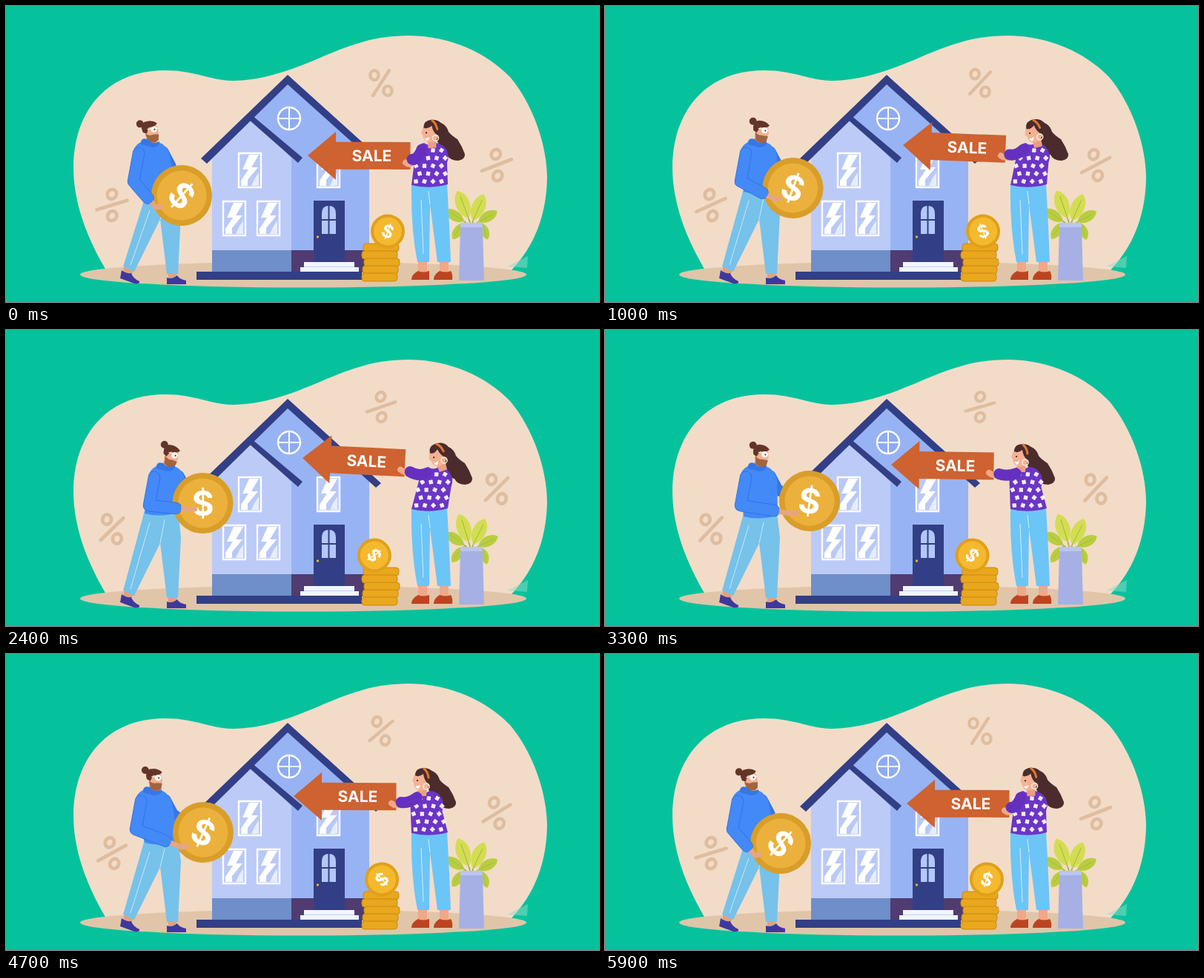
An HTML page for the animation above (6000 ms loop, 800 px wide and 400 px high).

```html
<!DOCTYPE html>
<html lang="en">
<head>
<meta charset="utf-8">
<title>House for sale</title>
<style>
  html, body { margin: 0; width: 100%; height: 100%; overflow: hidden; background: #05c29d; }
  svg { display: block; width: 100vw; height: 100vh; }
  text { font-family: Inter, "Open Sans", sans-serif; font-weight: 700; fill: #fff; text-anchor: middle; }
  .round { fill: none; stroke-linecap: round; stroke-linejoin: round; }
</style>
</head>
<body>
<svg viewBox="0 0 800 400" xmlns="http://www.w3.org/2000/svg">
  <defs>
    <g id="percent" class="round" stroke="#dfbd9f" stroke-width="4.4">
      <path d="M-11 17L11 -17"/>
      <ellipse cx="-9" cy="-10.500" rx="5.600" ry="6.400"/>
      <ellipse cx="9" cy="10.500" rx="5.600" ry="6.400"/>
    </g>
    <g id="window">
      <path d="M0 0H32V48H0z" fill="#b9c9f7"/>
      <path d="M15 3H28L18 20H27L13 37V45H4V38L14 23H6z" fill="#fff"/>
      <path d="M28 27V45H18L22 36z" fill="#e6edfd"/>
      <path d="M1 1H31V47H1z" fill="none" stroke="#fff" stroke-width="2.4"/>
    </g>
    <path id="flower" d="M-1.800 0H1.800M0 -1.800V1.800" class="round" stroke="#f6effd" stroke-width="3.2"/>
    <path id="leaf" d="M0 0C-17 -13 -15 -38 -2 -48C13 -40 15 -14 0 0z"/>
  </defs>

  <path fill="#f2dcc8" d="M135 357C112 318 91 270 91 218C91 172 108 132 140 109C166 90 198 85 230 87.500C262 91 280 101 306 101C376 100 430 62 480 49C500 43 520 40 545 40C600 41 648 63 680 96C712 134 730 190 730 232C729 285 712 325 682 357z"/>
  <use href="#percent" id="pTop"/>
  <use href="#percent" id="pLeft"/>
  <use href="#percent" id="pRight"/>
  <ellipse cx="401" cy="363" rx="301" ry="17.500" fill="#e0c5a9"/>
  <path d="M676 352L704 338L703 354z" fill="#8fdcc6" opacity=".5"/>

  <g id="house">
    <path d="M380 98L490 203V331H385V206L331 152z" fill="#98b3f4"/>
    <path d="M331 152L385 206V331H278V205z" fill="#bccaf8"/>
    <path d="M278 330H385V360H278z" fill="#6e8fc9"/>
    <path d="M385 330H490V360H385z" fill="#503c70"/>
    <path d="M380 93L506 207L499 213L380 106L271 213L263 206z" fill="#323f86"/>
    <path d="M331 147L400 205L394 212L327 153z" fill="#323f86"/>
    <circle cx="382" cy="152" r="15" fill="#8eabef" stroke="#fff" stroke-width="2.4"/>
    <path d="M382 137V167M367 152H397" stroke="#fff" stroke-width="2"/>
    <use href="#window" x="313" y="198"/>
    <use href="#window" x="292" y="263"/>
    <use href="#window" x="338" y="263"/>
    <use href="#window" x="419" y="198"/>
    <path d="M415 263H457V347H415z" fill="#323f86"/>
    <path d="M426 308V281Q426 270 435.5 270T445 281V308z" fill="#b3c8f9"/>
    <path d="M435.5 270V308M426 289H445" stroke="#323f86" stroke-width="2"/>
    <circle cx="420.500" cy="312" r="1.7" fill="#efb62e"/>
    <path d="M257 359H480V370H257z" fill="#323f86"/>
    <path d="M402 346H470V353H402zM397 353H476V359H397z" fill="#f1f5fd"/>
    <path d="M402 352.500H470" stroke="#c4d3f0"/>
  </g>

  <g id="stack" fill="#e9a71d" stroke="#c98a12" stroke-width="1"></g>
  <g id="smallCoin">
    <circle r="23" fill="#e0a01a"/><circle r="19" fill="#f4b92e"/>
    <text y="8.700" font-size="24">$</text>
  </g>

  <g id="leaves"></g>
  <path d="M613 299H643L645 371H611z" fill="#a6b0e5"/>
  <path d="M613 293H643V299H613z" fill="#bcc4f0"/>

  <g id="arrow">
    <path d="M0 0L38 -32.500V-18.500H138.500V18.500H38V32.500z" fill="#ce6230"/>
    <text x="86.500" y="7.500" font-size="21">SALE</text>
  </g>

  <g id="woman">
    <path d="M556 340H568V361H556zM585 340H597V361H585z" fill="#f0a888"/>
    <path d="M547 370Q547 363 556 358Q562 361 571 358V370zM577 370Q577 363 585 358Q593 361 600 358Q603 363 602 370z" fill="#bd4420"/>
    <path d="M547 241H595Q598 290 600 346H582L572 268L571 346H555Q546 300 547 241z" fill="#6cc5f7"/>
    <path d="M572 268L570 250M560 262L563 335" stroke="#d2effd" fill="none"/>
    <path id="tail" fill="#4c2b2c" d="M5 -31Q22 -31 26 -17Q30 -12 38 -7Q44 2 48 13Q49 20 39 22Q28 22 24 14Q16 12 14 3L7 -14z"/>
    <path id="blouse" fill="#6b35c6"/>
    <g id="flowers"></g>
    <g id="wFace"><g transform="translate(0 16)">
      <path d="M-3 -8H9L8 5H-3z" fill="#eb9f80"/>
      <path d="M-8 -24Q3 -32 11 -21L11 -8Q5 -1 -3 -3Q-9 -6 -9 -13L-11 -15z" fill="#f4b294"/>
      <path d="M-7 -23Q-7 -33 5 -33Q21 -32 20 -14Q15 -6 11 -11Q5 -16 4 -25Q-2 -20 -7 -23z" fill="#4c2b2c"/>
      <path d="M5 -32Q10 -28 11 -20" class="round" stroke="#dc7a2e" stroke-width="3"/>
      <path d="M-7 -9Q-3 -8 0 -10Q-1 -5 -4 -5z" fill="#fff"/>
      <circle cx="-4" cy="-16" r="1.100" fill="#392020"/>
      <circle cx="8" cy="-8" r="4" fill="none" stroke="#f8edda" stroke-width="1.600"/>
    </g></g>
    <path id="wArm" class="round" stroke="#f0a888" stroke-width="8"/>
    <path id="wSleeve" class="round" stroke="#6530bf" stroke-width="15"/>
  </g>

  <g id="man">
    <path d="M160 348L173 352L170 362L158 361zM219 355H230V368H219z" fill="#e2a17f"/>
    <path d="M156 357Q162 362 169 361Q171 368 180 372Q181 376 173 375L154 368zM217 367Q224 370 231 364Q233 369 243 371V376H217z" fill="#3d399c"/>
    <path id="pants" fill="#76c2eb"/>
    <path id="seam" stroke="#c8e9f9" fill="none"/>
    <path id="backArm" class="round" stroke="#3577e4" stroke-width="15"/>
    <path id="hoodie" fill="#4389f7"/>
    <g id="coin">
      <circle r="41" fill="#d99e29"/><circle r="33.500" fill="#ebb13c"/>
      <text y="16.500" font-size="46">$</text>
    </g>
    <path id="armEdge" class="round" stroke="#2d6cdd" stroke-width="16.500"/>
    <path id="hand" class="round" stroke="#e6a583" stroke-width="7"/>
    <path id="arm" class="round" stroke="#4389f7" stroke-width="15"/>
    <g id="mHead">
      <path d="M-7 -11H6L7 2Q0 5 -7 1z" fill="#d9936f"/>
      <path d="M-9 -24L7 -25L10 -14L8 -3Q-2 0 -8 -8z" fill="#f0b191"/>
      <path d="M-8 -12Q-2 -8 2 -10H10L9 -2Q2 3 -5 -2z" fill="#a2633f"/>
      <path d="M-11 -14Q-15 -24 -8 -28Q2 -31 9 -25Q6 -20 -3 -20L-6 -12z" fill="#633528"/>
      <circle cx="-14" cy="-26" r="5" fill="#633528"/>
      <path d="M-5 -18H9" stroke="#fff" stroke-width="1"/>
      <circle cx="4" cy="-17" r="3.600" fill="#fdf4ea" stroke="#fff"/>
      <circle cx="5" cy="-17" r="1" fill="#392020"/>
    </g>
    <path id="hood" fill="#3577e4"/>
  </g>
</svg>
<script>
const LOOP = 6000, STEP = 100, CYCLE = 5900;
const times = [0, 1000, 1800, 2400, 3300, 4700];
const tracks = {
  coinX:   [237, 253.5, 263.5, 265.5, 276, 266],
  coinY:   [256, 246, 234, 234, 231, 241],
  coinRot: [42, 20, 3, 0, 8, 24],
  handX:   [-35, -25, -17, -17, -24, -29],
  handY:   [16, 15, 8, 9, 17, 20],
  neckX:   [197, 208, 218, 218, 208, 200],
  nod:     [-5, 12, 20, 20, 12, 4],
  waistY:  [264, 251, 248, 248, 252, 255],
  arrowX:  [407, 402, 402, 400, 386, 388],
  arrowY:  [202, 188, 174, 173, 182, 192],
  arrowRot:[0.2, 2.2, 2.7, 2.8, 0.8, 0.3],
  wNeckX:  [571, 577, 582, 581, 559, 559],
  wNod:    [-4, -14, -22, -18, 0, 0]
};

const $ = id => document.getElementById(id);
const path = (id, d) => $(id).setAttribute("d", d);
const place = (id, x, y, r = 0, s = 1) =>
  $(id).setAttribute("transform", `translate(${x} ${y}) rotate(${r}) scale(${s})`);
const mix = (a, b, k) => a + (b - a) * k;

// Cyclic cubic through the keys, flat at turning points
function sample(v, t) {
  const n = v.length;
  const at = i => times[(i + n) % n] + Math.floor(i / n) * CYCLE;
  const val = i => v[(i + n) % n];
  const slope = i => (val(i + 1) - val(i)) / (at(i + 1) - at(i));
  const tangent = i => {
    const a = slope(i - 1), b = slope(i);
    return a * b <= 0 ? 0 : 2 * a * b / (a + b);
  };
  let i = n - 1;
  while (t < times[i]) i--;
  const h = at(i + 1) - at(i), u = (t - at(i)) / h, w = 1 - u;
  return val(i) * w * w * (1 + 2 * u) + val(i + 1) * u * u * (3 - 2 * u)
    + h * u * w * (tangent(i) * w - tangent(i + 1) * u);
}

$("stack").innerHTML = [[482, 321], [480, 331], [483, 341], [481, 351], [480, 361]]
  .map(([x, y]) => `<rect x="${x}" y="${y}" width="48" height="11" rx="4"/>`).join("");

// Each leaf: base, angle, size
$("leaves").innerHTML = [
  [-10, -4, -57, .62], [9, -3, 62, .62], [-11, -2, -145, .55],
  [15, -1, 165, .47], [-4, -8, -20, .84], [2, -5, 24, .8]
].map(([x, y, r, s], i) => `<path d="M0 4L${x} ${y}" stroke="#92ae31" stroke-width="1.5"/>`
  + `<g transform="translate(${x} ${y}) rotate(${r}) scale(${s})">`
  + `<use href="#leaf" fill="${i < 4 ? "#b9cd40" : "#d3dd52"}"/><path d="M0 0V-38" stroke="#9db437"/></g>`).join("");

const flowers = [];
for (let row = 0; row < 5; row++)
  for (let col = 0; col < 4; col++)
    flowers.push([553 + col * 11.5 + (row % 2) * 5, 195 + row * 10.5]);
$("flowers").innerHTML = flowers.map(() => '<use href="#flower"/>').join("");
const flowerNodes = [...$("flowers").children];

function drawMan(p) {
  const { neckX: n, waistY: w, coinX: cx, coinY: cy } = p;
  const hx = cx + p.handX, hy = cy + p.handY;
  path("pants", `M187 ${w - 4}L158 352L173 359L208 288L217 362H232L236 280L232 ${w - 4}z`);
  path("seam", `M194 ${w + 12}L168 350M214 ${w + 8}L208 288`);
  path("backArm", `M${n + 15} 197L${n + 25} 216L${cx - 8} ${cy}`);
  path("hoodie", `M${n - 10} 182Q${n - 27} 187 ${n - 26} 204L187 ${w}Q210 ${w + 6} 233 ${w - 2}L${n + 24} 202Q${n + 20} 188 ${n + 9} 184z`);
  path("hood", `M${n - 15} 187Q${n - 16} 177 ${n - 6} 180Q${n} 188 ${n + 10} 183Q${n + 11} 190 ${n} 191z`);
  const ex = n - 25, limb = `M${n - 18} 199L${ex} 237L${mix(ex, hx, .65)} ${mix(237, hy, .65)}`;
  path("arm", limb);
  path("armEdge", limb);
  path("hand", `M${mix(ex, hx, .6)} ${mix(237, hy, .6)}L${hx} ${hy}l6 -1`);
  place("coin", cx, cy, p.coinRot);
  place("mHead", n, 184, p.nod);
}

function drawWoman(p) {
  const n = p.wNeckX, c = mix(571, n, .55), a = p.arrowRot * Math.PI / 180;
  const hx = p.arrowX + 135, hy = p.arrowY + 135 * Math.sin(a) + 11;
  const sx = c - 10, mx = (sx + hx) / 2, my = Math.max(198, hy) + 2;
  place("tail", n, 187);
  place("wFace", n, 171, p.wNod);
  path("blouse", `M${c - 7} 185Q${c - 20} 188 ${c - 19} 202L547 242Q571 248 596 241L${c + 24} 212Q${c + 29} 200 ${c + 20} 190Q${c + 14} 185 ${c + 7} 185Q${c} 190 ${c - 7} 185z`);
  flowerNodes.forEach((f, i) => {
    const [x, y] = flowers[i];
    f.setAttribute("transform", `translate(${x + (c - 571) * (243 - y) / 56} ${y}) rotate(${i * 25})`);
  });
  path("wArm", `M${sx} 196Q${mx} ${my} ${hx} ${hy}l-3 -2`);
  path("wSleeve", `M${sx} 194Q${mix(sx, mx, .7)} ${mix(194, my, .7)} ${mix(sx, hx, .68)} ${mix(194, hy, .68)}`);
}

function draw(now) {
  const t = Math.floor(now % LOOP / STEP) * STEP;
  const sway = (1 - Math.cos(2 * Math.PI * t / LOOP)) / 2;
  const p = {};
  for (const k in tracks) p[k] = sample(tracks[k], t % CYCLE);

  place("pTop", 506, 104, 42 * sway);
  place("pLeft", 143, 269, 40 - 30 * sway, 1.06);
  place("pRight", 662, 215, 36 - 26 * sway, 1.06);
  place("smallCoin", 515 - 20 * sway, 304.500, 20 - 160 * sway);
  place("leaves", 628, 295, 3 * sway);
  place("arrow", p.arrowX, p.arrowY, p.arrowRot);
  drawWoman(p);
  drawMan(p);
}

const start = performance.now();
function tick() {
  draw(performance.now() - start);
  requestAnimationFrame(tick);
}
tick();
</script>
</body>
</html>
```
